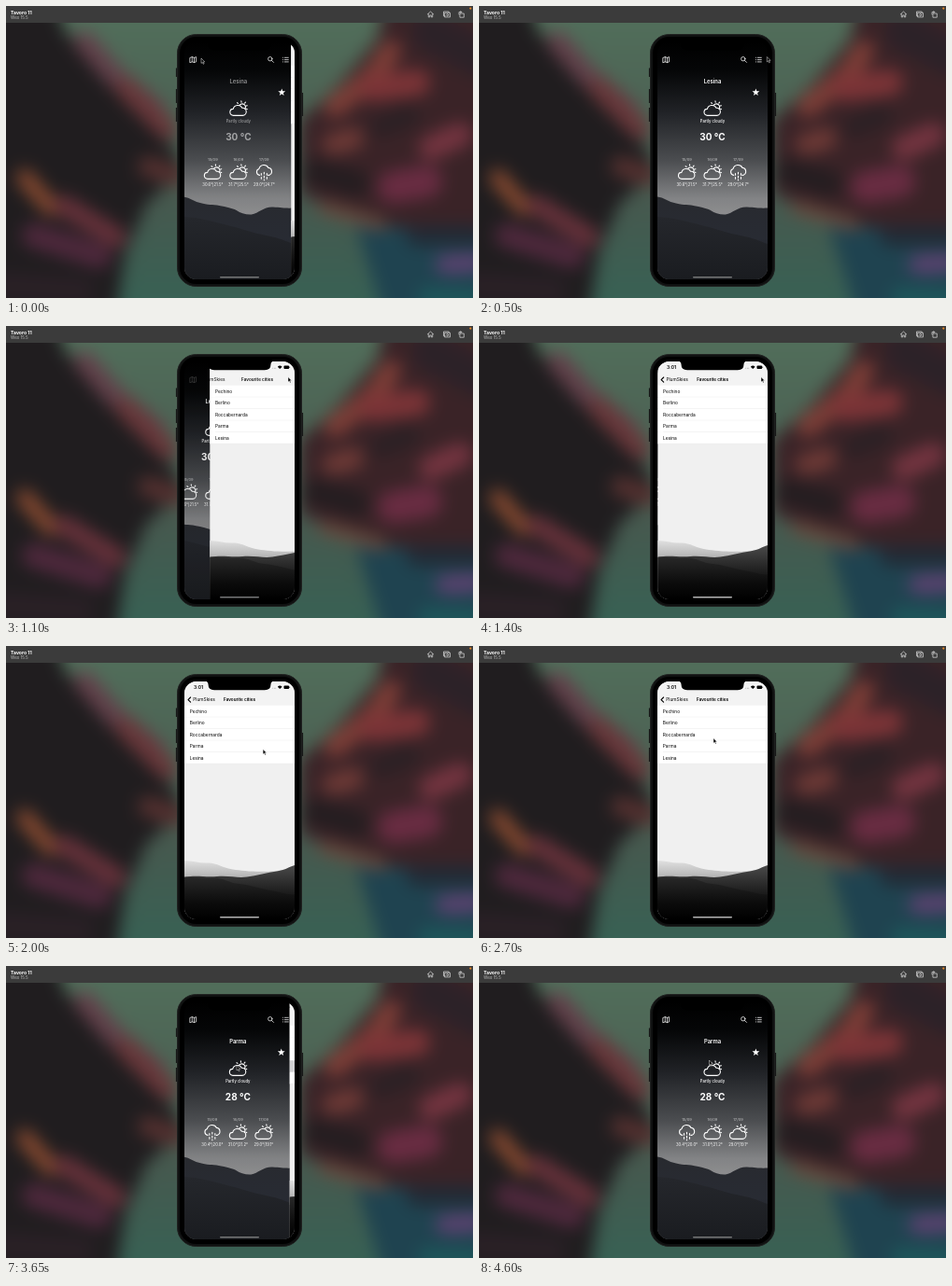
Animation, 500 px wide and 313 px high, one loop 4.8 s. Source, as an HTML page:

```html
<!DOCTYPE html>
<html lang="en">
<head>
<meta charset="utf-8">
<title>Weather app demo</title>
<style>
html, body { margin: 0; width: 100%; height: 100%; overflow: hidden; background: #242224; }
svg { position: absolute; inset: 0; width: 100%; height: 100%; }
text { font-family: Inter, Roboto, sans-serif; }
.mid { text-anchor: middle; }
.line { fill: none; stroke: #fff; stroke-width: 1.1; stroke-linecap: round; stroke-linejoin: round; }
.thin { stroke-width: .75; }
.bold { font-weight: 600; }
.smear { fill: none; stroke-linecap: round; stroke-linejoin: round; }
</style>
</head>
<body>
<svg viewBox="0 0 500 313" preserveAspectRatio="none">
  <defs>
    <linearGradient id="base" x1="0" y1="0" x2="0" y2="1">
      <stop offset="0" stop-color="#55765f"/><stop offset=".6" stop-color="#47584e"/><stop offset="1" stop-color="#2f6657"/>
    </linearGradient>
    <filter id="blur" filterUnits="userSpaceOnUse" x="-60" y="-60" width="620" height="440" color-interpolation-filters="sRGB">
      <feGaussianBlur stdDeviation="9"/>
    </filter>
  </defs>
  <g filter="url(#blur)">
    <rect x="-60" y="-60" width="620" height="440" fill="url(#base)"/>
    <path d="M-60-60H40L62 25L105 75L165 130L190 175L150 212L128 265L110 380H-60Z" fill="#201d1f"/>
    <path d="M415-60L398 35L350 92L315 122V200L370 226L430 240L560 250V-60Z" fill="#3a2327"/>
    <path d="M375 236L560 240V380H420Z" fill="#1f4350"/>
    <g class="smear" stroke-width="22">
      <path d="M84 38L115 74L160 112" stroke="#62404a"/>
      <path d="M128 88L172 132" stroke="#69373a"/>
      <path d="M152 172L182 182" stroke="#53302f"/>
      <path d="M20 184L48 216" stroke="#84482f" stroke-width="18"/>
      <path d="M62 214L118 248" stroke="#66313a"/>
      <path d="M30 246L100 268" stroke="#4e283c" stroke-width="26"/>
      <path d="M0 300L80 305" stroke="#2a2026" stroke-width="28"/>
      <path d="M455 28L505 55" stroke="#2c2228" stroke-width="40"/>
      <path d="M352 108L394 74L412 48" stroke="#7f3e37"/>
      <path d="M392 88L440 82" stroke="#7c3437" stroke-width="28"/>
      <path d="M400 130L432 118" stroke="#2b2024"/>
      <path d="M350 148L372 142" stroke="#6f3a36"/>
      <path d="M330 178L375 190" stroke="#241d20" stroke-width="28"/>
      <path d="M455 152L486 138" stroke="#743440" stroke-width="26"/>
      <path d="M415 194L450 188" stroke="#692c42" stroke-width="34"/>
      <path d="M340 216L400 234" stroke="#654a3e" stroke-width="14"/>
      <path d="M440 246L505 246" stroke="#222a35"/>
      <path d="M470 277L505 275" stroke="#5c4270" stroke-width="20"/>
      <path d="M450 312L505 314" stroke="#1d5a5c" stroke-width="18"/>
    </g>
  </g>
</svg>
<svg viewBox="0 0 500 313" preserveAspectRatio="none">
  <defs>
    <linearGradient id="sky" x1="0" y1="0" x2="0" y2="1">
      <stop offset="0" stop-color="#000"/><stop offset=".12" stop-color="#050607"/>
      <stop offset=".3" stop-color="#212327"/><stop offset=".5" stop-color="#4b4d50"/>
      <stop offset=".66" stop-color="#828385"/><stop offset=".75" stop-color="#919192"/>
    </linearGradient>
    <linearGradient id="ridge" x1="0" y1="0" x2="0" y2="1">
      <stop offset="0" stop-color="#282a2f"/><stop offset=".5" stop-color="#282b33"/><stop offset="1" stop-color="#1d1f23"/>
    </linearGradient>
    <linearGradient id="slope" x1="0" y1="0" x2="0" y2="1">
      <stop offset="0" stop-color="#25272c"/><stop offset="1" stop-color="#1a1c20"/>
    </linearGradient>
    <linearGradient id="fog" x1="0" y1="0" x2="0" y2="1">
      <stop offset="0" stop-color="#e0e0e0"/><stop offset="1" stop-color="#a0a0a0"/>
    </linearGradient>
    <linearGradient id="hill" x1="0" y1="0" x2="0" y2="1">
      <stop offset="0" stop-color="#4a4a4a"/><stop offset=".5" stop-color="#1d1d1d"/><stop offset="1" stop-color="#000"/>
    </linearGradient>
    <linearGradient id="near" x1="0" y1="0" x2="0" y2="1">
      <stop offset="0" stop-color="#282828"/><stop offset=".6" stop-color="#0c0c0c"/><stop offset="1" stop-color="#000"/>
    </linearGradient>
    <clipPath id="screen"><rect x="191" y="38" width="118" height="255" rx="13"/></clipPath>
    <clipPath id="page"><rect x="191" y="38" width="118" height="255"/></clipPath>
    <g id="cloudy" class="line">
      <path d="M-5.4 7.4A3.5 3.5 0 0 1-5.6 .4A5.2 5.2 0 0 1 4-.8A4.1 4.1 0 0 1 4.6 7.4Z"/>
      <path d="M1.2-3.6A3.3 3.3 0 1 1 7 .4M-.4-5.6l-.9-.7M3.2-6.9l-.2-1.2M6.8-5.9l.8-1M8.4-3l1-.3M8.5 .2l.9.4"/>
    </g>
    <g id="rain" class="line">
      <path d="M-4.8 3.4A3.6 3.6 0 0 1-5.4-3.6A5.4 5.4 0 0 1 4.6-4.6A4.1 4.1 0 0 1 5.2 3.4H4.4"/>
      <path d="M-3 1.6v1.6M-3 5.6v1.6M0 .4v1.6M0 4.4v1.6M0 8v.8M3 1.6v1.6M3 5.6v1.6"/>
    </g>
  </defs>

  <rect width="500" height="18" fill="#3b3b3b"/>
  <text x="5" y="8.6" font-size="5.1" font-weight="700" fill="#fff">Tavoro 11</text>
  <text x="5" y="14" font-size="4.5" fill="#b9b9b9">Wex 15.5</text>
  <g class="line thin" style="stroke:#d2d2d2">
    <path d="M451.3 8.9L454.5 6l3.2 2.9M452.3 8.6v3.3h1.4v-2h1.6v2h1.4V8.6"/>
    <path d="M470 10.7h-1.5V6h5.7v1M470 7.3h5.5v4.6H470Z"/><circle cx="472.7" cy="9.6" r="1"/>
    <path d="M486.3 8h4v4.2h-4ZM485 9V6.5h2.6M486.7 5.4l1.1 1.1-1.1 1.1"/>
  </g>
  <circle cx="497.3" cy="2.6" r="1.1" fill="#f08a24"/>

  <path d="M182.6 66.5v9.5M182.6 89v15M182.6 109v15M317.4 93v25" stroke="#161717" stroke-width="1.4"/>
  <rect x="183.5" y="30.5" width="133" height="270" rx="20" fill="#101111" stroke="#1f2120"/>
  <rect x="186" y="33" width="128" height="265" rx="17.5" fill="#000"/>

  <g clip-path="url(#screen)">
    <g id="detail">
      <rect x="191" y="38" width="160" height="255" fill="url(#sky)"/>
      <path d="M191 204.5Q196 205 200 207.5T211 211.5T222 213T235 215T247 218.5Q255 224 264 223.5C272 222 277 215 287 215.5S300 217 309 216.5L351 213V293H191Z" fill="url(#ridge)"/>
      <path d="M191 226C210 227 222 231 240 235.5S264 243 280 246S300 252 309 255L351 262V293H191Z" fill="url(#slope)"/>
      <g id="info" fill="#fff">
        <text id="city" class="mid bold" x="250" y="83.2" font-size="5.9"></text>
        <text id="temp" class="mid" x="250" y="144" font-size="10" font-weight="700"></text>
        <text class="mid" x="250" y="125" font-size="4.2" font-weight="500">Partly cloudy</text>
      </g>
      <use href="#cloudy" x="250" y="110"/>
      <path id="star" fill="#fff"/>
      <g id="days"></g>
    </g>
    <g id="tools" class="line thin">
      <path d="M197.2 55.4l2.1-.8 2.2.8 2.1-.8v5.2l-2.1.8-2.2-.8-2.1.8ZM199.3 54.6v5.2M201.5 55.4v5.2"/>
      <circle cx="282.8" cy="56.7" r="2.2"/><path d="M284.5 58.4l2 2"/>
      <path d="M298.3 55.3h4M298.3 57.6h4M298.3 59.9h4M296.5 55.3h.1M296.5 57.6h.1M296.5 59.9h.1"/>
    </g>
    <rect id="shade" x="191" y="38" width="118" height="255"/>
    <g id="list" clip-path="url(#page)">
      <rect x="191" y="38" width="118" height="255" fill="#f0f0f0"/>
      <path d="M191 230C200 230 207 233 216 232.5S232 238 243 239.5S270 243 290 241L309 238V256H191Z" fill="url(#fog)"/>
      <path d="M191 247.5C206 245.5 212 248 226 247S248 249 258 247.5S280 243 290 241.5S303 236.5 309 235V293H191Z" fill="url(#hill)"/>
      <path d="M191 248C200 247 208 249.5 220 248.5S238 254 250 255S272 260 284 262S300 267 309 266V293H191Z" fill="url(#near)"/>
      <rect x="191" y="38" width="118" height="26" fill="#f3f3f3"/>
      <g id="rows"></g>
      <text id="title" class="mid bold" x="250" y="59.3" font-size="4.6">Favourite cities</text>
      <g id="back">
        <path d="M197.6 55l-2.6 2.6 2.6 2.6" class="line" style="stroke:#000"/>
        <text x="200.3" y="59.3" font-size="4.8">PlumSkies</text>
      </g>
      <g id="status">
        <text x="201" y="46" font-size="5" class="bold">3:01</text>
        <path d="M285.5 45.3h.6M287 45.3h.6M288.5 45.3h.6" stroke="#777" stroke-width=".7"/>
        <path d="M293.2 46l-2.4-2.3a3.5 3.5 0 0 1 4.8 0Z"/>
        <rect x="297.5" y="42.6" width="5.6" height="3.3" rx=".9"/><path d="M303.6 43.7v1.2" stroke="#000" stroke-width=".6"/>
      </g>
    </g>
    <path d="M213 37.5H287Q283.5 38 283.5 41Q283.5 47.2 277 47.2H223Q216.5 47.2 216.5 41Q216.5 38 213 37.5Z"/>
    <rect id="home" x="229" y="290" width="42" height="1.4" rx=".7"/>
  </g>
  <path id="cursor" d="M0 0V5.4L1.3 4.3L2.2 6.3L3.1 5.9L2.2 3.9H3.8Z" fill="#000" stroke="#fff" stroke-width=".45"/>
</svg>
<script>
const LOOP = 4800, STEP = 50, WIDTH = 118;
const PUSH = 950, POP = 3392, POP_LEAD = 281;
const $ = id => document.getElementById(id);
const set = (el, attrs) => { for (const k in attrs) el.setAttribute(k, attrs[k]); };
const shift = (id, x, y = 0) => set($(id), { transform: `translate(${x.toFixed(2)} ${y.toFixed(2)})` });
const clamp = x => Math.min(1, Math.max(0, x));

let star = '';
for (let i = 0; i < 10; i++) {
  const r = i % 2 ? 1.7 : 4.1, a = Math.PI * (i / 5 - .5);
  star += `${i ? 'L' : 'M'}${(296.4 + r * Math.cos(a)).toFixed(2)} ${(92.6 + r * Math.sin(a)).toFixed(2)}`;
}
set($('star'), { d: star + 'Z' });

$('rows').innerHTML = ['Pechino', 'Berlino', 'Roccabernarda', 'Parma', 'Lesina'].map((name, i) => {
  const y = 63.8 + 12.5 * i;
  return `<rect x="191" y="${y}" width="118" height="12.5" fill="#fff"/>
    <path d="M${i < 4 ? 197 : 191} ${y + 12.4}H309" stroke="#dcdcdc" stroke-width=".4"/>
    <text x="196.8" y="${y + 8}" font-size="4.8">${name}</text>`;
}).join('');
const picked = $('rows').querySelectorAll('rect')[3];

const cities = {
  Lesina: { temp: '30 °C', days: [['cloudy', '30.6°|21.5°'], ['cloudy', '31.7°|25.5°'], ['rain', '29.0°|24.7°']] },
  Parma: { temp: '28 °C', days: [['rain', '30.4°|20.0°'], ['cloudy', '31.0°|21.2°'], ['cloudy', '29.0°|19.1°']] }
};
let shown;
function showCity(name) {
  if (name === shown) return;
  shown = name;
  $('city').textContent = name;
  $('temp').textContent = cities[name].temp;
  $('days').innerHTML = cities[name].days.map(([icon, range], i) => {
    const x = 222.5 + 27.5 * i;
    return `<text class="mid" x="${x}" y="165.7" font-size="4.1" fill="#c2c3c4">${15 + i}/09</text>
      <use href="#${icon}" x="${x}" y="178"/>
      <text class="mid" x="${x}" y="192.6" font-size="4.2" fill="#fff">${range}</text>`;
  }).join('');
}

// Critically damped spring used for page transitions
const spring = ms => {
  const k = Math.max(0, ms) * .0187;
  return k > 9.2 ? 1 : 1 - (1 + k) * Math.exp(-k);
};
function listShown(t) {
  if (t < PUSH) return 1 - spring(t + POP_LEAD);
  return t < POP ? spring(t - PUSH) : 1 - spring(t - POP);
}

// time, x, y
const path = [
  [0, 209, 56], [500, 308.3, 54.5], [600, 308.3, 54.5], [850, 302, 54.7], [1500, 302, 54.7],
  [2050, 274.5, 112], [2250, 270.5, 129], [2400, 270.5, 129], [2700, 251, 98.8],
  [2950, 247, 106.5], [4400, 247, 106.5], [4600, 246.5, 101], [LOOP, 246.5, 101]
];
function cursorAt(t) {
  const i = path.findIndex(p => p[0] > t);
  const [t0, x0, y0] = path[i - 1], [t1, x1, y1] = path[i];
  const u = (t - t0) / (t1 - t0), e = u * u * (3 - 2 * u);
  return [x0 + (x1 - x0) * e, y0 + (y1 - y0) * e];
}

function draw(t) {
  const p = listShown(t), off = WIDTH * (1 - p), ink = clamp(p * 1.2);
  showCity(t < 2000 ? 'Lesina' : 'Parma');
  shift('detail', -.3 * WIDTH * p);
  set($('info'), { opacity: .55 + .45 * clamp(t / 150) });
  set($('tools'), { opacity: 1 - p });
  set($('shade'), { opacity: .1 * p });
  set($('list'), { visibility: p > 0 ? 'visible' : 'hidden' });
  shift('list', off);
  shift('title', -.3 * off);
  shift('back', -.6 * off);
  shift('status', -off);
  set($('title'), { opacity: ink });
  set($('back'), { opacity: ink });
  set(picked, { fill: t >= POP ? '#d1d1d3' : '#fff' });
  set($('home'), { fill: p > .9 ? '#b5b5b5' : '#777879' });
  shift('cursor', ...cursorAt(t));
}

const start = performance.now();
function tick() {
  const t = (performance.now() - start) % LOOP;
  draw(Math.floor(t / STEP) * STEP);
  requestAnimationFrame(tick);
}
tick();
</script>
</body>
</html>
```
